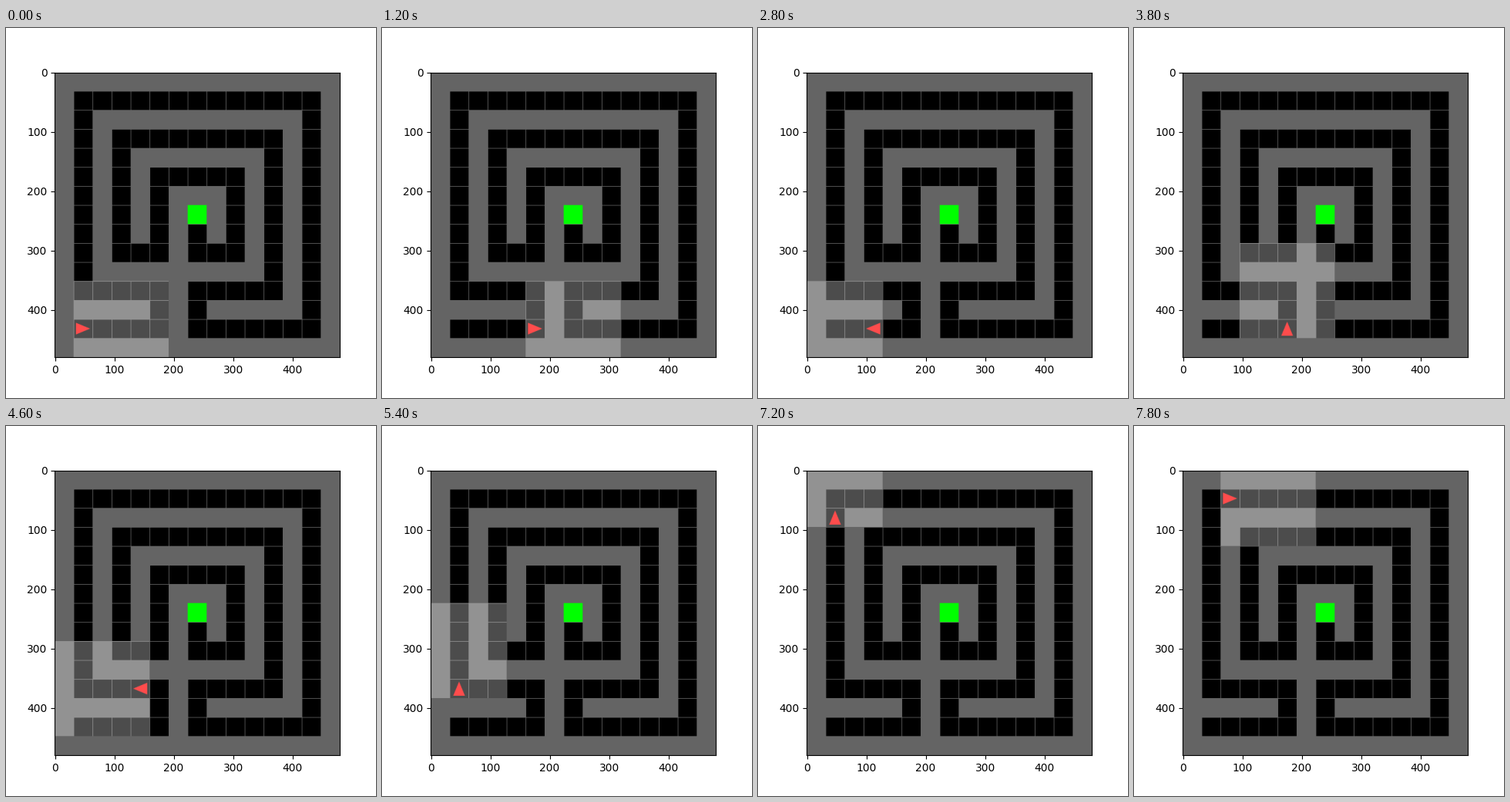
A matplotlib script that plays this animation: 480x480 px, repeating every 8000 ms.

```python
import numpy as np
import matplotlib.pyplot as plt
from matplotlib.animation import FuncAnimation

TILE, SUB, VIEW = 32, 3, 5
GREY, GREEN, RED = (100, 100, 100), (0, 255, 0), (255, 0, 0)

MAZE = [
    "###############",
    "#.............#",
    "#.###########.#",
    "#.#.........#.#",
    "#.#.#######.#.#",
    "#.#.#.....#.#.#",
    "#.#.#.###.#.#.#",
    "#.#.#.#G#.#.#.#",
    "#.#.#.#.#.#.#.#",
    "#.#...#...#.#.#",
    "#.#########.#.#",
    "#.....#.....#.#",
    "#####.#.#####.#",
    "#.....#.......#",
    "###############",
]
SIZE = len(MAZE)
HEADINGS = [(1, 0), (0, 1), (-1, 0), (0, -1)]

# F = forward, L / R = turn
MOVES = "FFFFLRLF" "LLFRFF" "RRFFL" "FFLFFFFR" + "F" * 10 + "RF"


def walk(x, y, heading):
    states = [(x, y, heading)]
    for move in MOVES:
        if move == "F":
            dx, dy = HEADINGS[heading]
            x, y = x + dx, y + dy
        else:
            heading = (heading + (1 if move == "R" else -1)) % 4
        states.append((x, y, heading))
    return states


def floor_tile(kind):
    tile = np.zeros((TILE, TILE, 3))
    tile[0] = tile[:, 0] = GREY
    if kind != ".":
        tile[:] = GREY if kind == "#" else GREEN
    return tile


def agent_mask(heading):
    """Coverage of the arrow inside one tile, antialiased by supersampling."""
    n = TILE * SUB
    c = (np.arange(n) + 0.5) / n - 0.5
    px, py = np.meshgrid(c, c)
    dx, dy = HEADINGS[heading]
    along, across = px * dx + py * dy, py * dx - px * dy
    inside = (along >= -0.38) & (np.abs(across) <= 0.31 * (0.37 - along) / 0.75)
    return inside.reshape(TILE, SUB, TILE, SUB).mean(axis=(1, 3))[..., None]


def view_box(x, y, heading):
    """Pixel slices of the square the agent sees ahead of it."""
    half = VIEW // 2
    dx, dy = HEADINGS[heading]
    left, top = x + half * dx - half, y + half * dy - half
    return tuple(slice(max(a, 0) * TILE, min(a + VIEW, SIZE) * TILE)
                 for a in (top, left))


BASE = np.vstack([np.hstack([floor_tile(k) for k in row]) for row in MAZE])
STATES = walk(1, 13, 0)


def render(i):
    x, y, heading = STATES[i]
    img = BASE.copy()
    cell = img[y * TILE:(y + 1) * TILE, x * TILE:(x + 1) * TILE]
    cell += agent_mask(heading) * (np.array(RED) - cell)
    box = view_box(x, y, heading)
    img[box] += 0.3 * (255 - img[box])
    return img.astype(np.uint8)


fig = plt.figure(figsize=(4.8, 4.8), dpi=100)
ax = fig.add_axes([63.2 / 480, 0.11, 0.77, 0.77])
picture = ax.imshow(render(0))
ax.set_xticks(range(0, 401, 100))
ax.set_yticks(range(0, 401, 100))


def update(i):
    picture.set_data(render(i))
    return [picture]


anim = FuncAnimation(fig, update, frames=len(STATES), interval=200,
                     repeat=True, repeat_delay=0)
plt.show()
```
